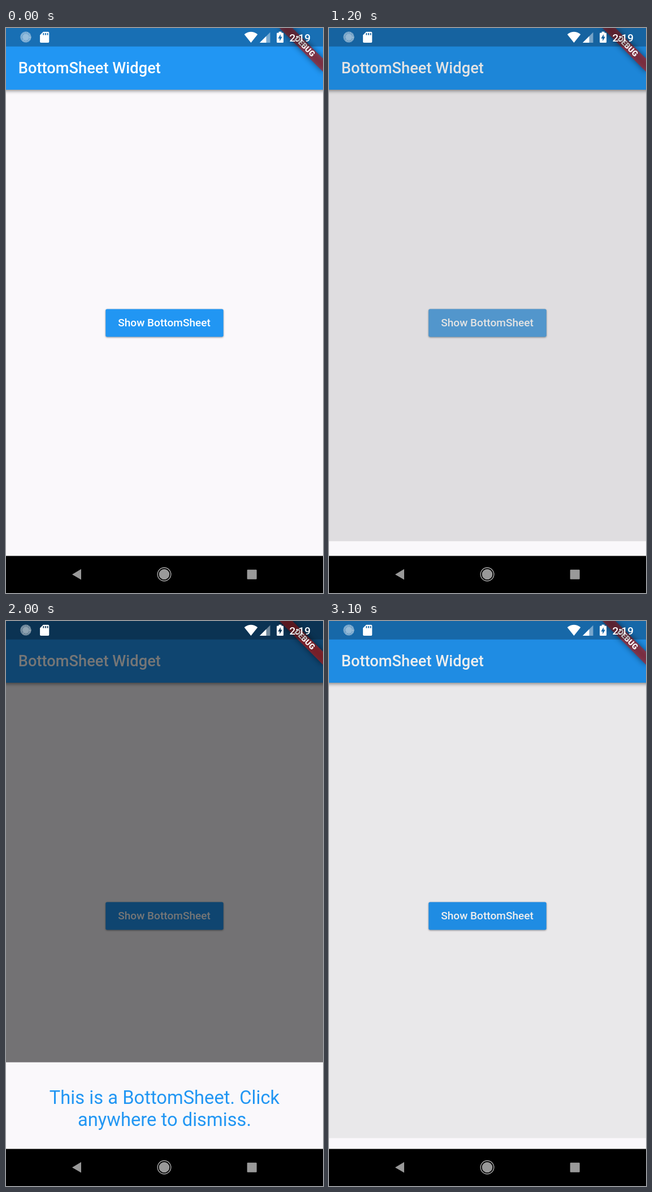
Recreate the animation shown at these times as an HTML page. Size 561 by 998 pixels, loop 3800 ms.

```html
<!DOCTYPE html>
<html lang="en">
<head>
<meta charset="utf-8">
<title>BottomSheet Widget</title>
<style>
  html, body { margin: 0; width: 100%; height: 100%; overflow: hidden; background: #000; }
  svg { display: block; width: 100%; height: 100%; font-family: Roboto, sans-serif; }
  .bar { filter: drop-shadow(0 2.5px 3px rgba(0, 0, 0, .45)); }
  .button { filter: drop-shadow(0 1.8px 1.6px rgba(0, 0, 0, .42)); }
  .blur { filter: blur(5.4px); }
  .mid { text-anchor: middle; }
  .medium { font-weight: 500; }
</style>
</head>
<body>
<svg viewBox="0 0 561 998">
  <!-- page -->
  <rect width="561" height="998" fill="#faf8fb"/>
  <rect class="bar" x="-20" y="-20" width="601" height="129" fill="#2196f3"/>
  <text class="medium" x="21.8" y="80.4" font-size="27.27" fill="#fff">BottomSheet Widget</text>
  <rect class="button" x="176.3" y="496.4" width="208.4" height="49" rx="2.7" fill="#2196f3"/>
  <rect id="splash" x="176.3" y="496.4" width="208.4" height="49" rx="2.7" fill="#c8c8c8" opacity="0"/>
  <text class="medium mid" x="280" y="527.4" font-size="19.09" fill="#fff">Show BottomSheet</text>

  <rect id="scrim" width="561" height="998" opacity="0"/>
  <g id="sheet" transform="translate(0 932.5)">
    <rect width="561" height="164" fill="#faf8fb"/>
    <g class="mid" font-size="32.73" fill="#2196f3">
      <text x="280.5" y="74">This is a BottomSheet. Click</text>
      <text x="280.5" y="112.4">anywhere to dismiss.</text>
    </g>
  </g>

  <!-- corner banner -->
  <g transform="translate(561 0) rotate(45)">
    <rect class="blur" x="-54.5" y="38.2" width="109" height="16.4" opacity=".5"/>
    <rect x="-54.5" y="38.2" width="109" height="16.4" fill="#b71c1c" opacity=".627"/>
    <text class="mid" y="50.4" font-size="13.9" font-weight="900" fill="#fff">DEBUG</text>
  </g>

  <!-- status bar -->
  <rect width="561" height="32.7" opacity=".26"/>
  <g fill="#fff">
    <circle cx="35" cy="16" r="6" opacity=".55"/>
    <circle cx="35" cy="16" r="7.8" fill="none" stroke="#fff" stroke-width="3.6" stroke-dasharray="1.2 .85" opacity=".75"/>
    <path fill-rule="evenodd" d="M65.8 6.8h8.8q1.7 0 1.7 1.7v15.8q0 1.7-1.7 1.7h-12.8q-1.7 0-1.7-1.7v-11.8zM65.4 9v3.6h1.9v-3.6zM69 9v3.6h1.9v-3.6zM72.6 9v3.6h1.9v-3.6z"/>
    <path d="M421.7 11.2Q433.5 2.4 445.3 11.2L433.5 26z"/>
    <path d="M449 26L467.5 7.5V26z" opacity=".42"/>
    <path d="M449 26L460.5 14.5V26z"/>
    <path fill-rule="evenodd" d="M482.7 6.6h4.8v1.8h2.4q1.2 0 1.2 1.2v15.2q0 1.2-1.2 1.2h-9.6q-1.2 0-1.2-1.2v-15.2q0-1.2 1.2-1.2h2.4zM486 11l-4.6 7.4h2.9v4.8l4.6-7.6h-2.9z"/>
    <text class="medium" x="501.4" y="23.9" font-size="19.09">2:19</text>
  </g>

  <!-- navigation bar -->
  <rect y="932.5" width="561" height="65.5"/>
  <g fill="#999">
    <path d="M117 965.2L133 955.8V974.6z"/>
    <circle cx="280" cy="965" r="9.3"/>
    <circle cx="280" cy="965" r="11.8" fill="none" stroke="#aaa" stroke-width="1.4"/>
    <rect x="426.7" y="956.7" width="17" height="17" rx="1.2"/>
  </g>
</svg>
<script>
  const LOOP = 3800, STEP = 100, RATE = .0044, CLOSE = 2800;
  const [sheet, scrim, splash] = ['sheet', 'scrim', 'splash'].map(id => document.getElementById(id));
  const clamp = (v, max = 1) => Math.max(0, Math.min(max, v));
  const bezier = (s, a, b) => 3 * s * (1 - s) * ((1 - s) * a + s * b) + s ** 3;

  // cubic-bezier(.25, .1, .25, 1), solved by bisection
  function ease(x) {
    let lo = 0, hi = 1;
    for (let i = 0; i < 20; i++) {
      const s = (lo + hi) / 2;
      if (bezier(s, .25, .25) < x) lo = s; else hi = s;
    }
    return x && bezier(hi, .1, 1);
  }

  // The sheet slides linearly; it settles just short of fully open until it closes.
  const openness = t => t < CLOSE ? clamp((t - 1164) * RATE, .933) : clamp((3126.5 - t) * RATE);

  function draw() {
    const t = Math.floor(performance.now() % LOOP / STEP) * STEP;
    const p = openness(t);
    sheet.setAttribute('transform', `translate(0 ${932.5 - 164 * p})`);
    scrim.setAttribute('opacity', .54 * ease(p));
    splash.setAttribute('opacity', t < 1200 ? 0 : clamp((1375 - t) * .002));
    requestAnimationFrame(draw);
  }
  draw();
</script>
</body>
</html>
```
